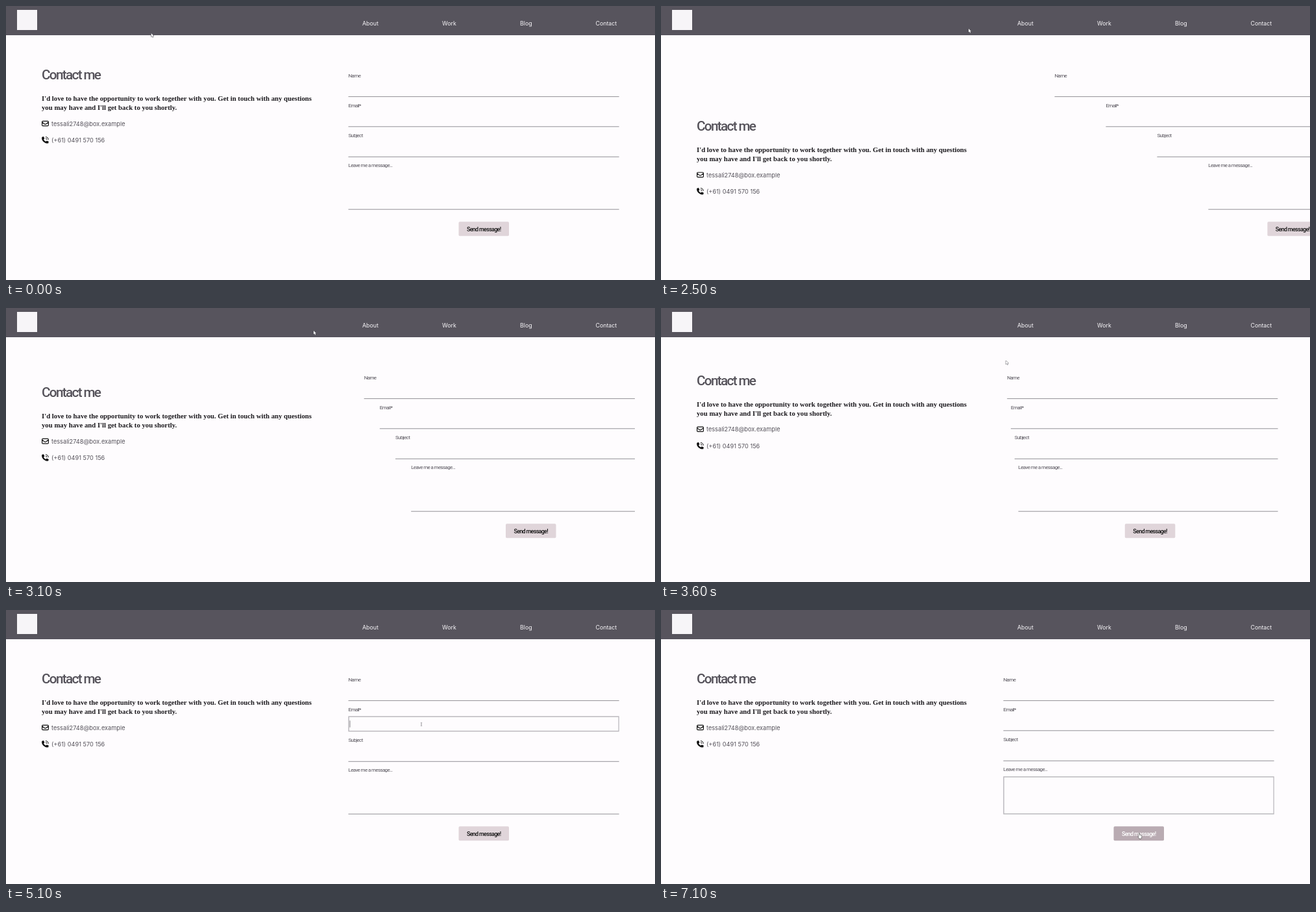
Recreate the animation shown at these times as an HTML page with a canvas. Size 1000 by 422 pixels, loop 7.3 s.

```html
<!DOCTYPE html>
<html lang="en">
<head>
<meta charset="utf-8">
<title>Contact page</title>
<style>
  html, body { margin: 0; width: 100%; height: 100%; overflow: hidden; background: #fefcfe; }
  canvas { display: block; width: 1000px; height: 422px; }
</style>
</head>
<body>
<canvas id="stage"></canvas>
<script>
const W = 1000, H = 422, LOOP = 7300, STEP = 1700 / 11;
const INK = '#55525a', PAPER = '#fefcfe', RULE = '#929096';
const LEFT = 527.5, RIGHT = 944.8;
const SANS = 'Inter, sans-serif';
const SERIF = "'Liberation Serif', serif";
const TIGHT = 'Roboto, sans-serif', TRACKING = -0.08;

const canvas = document.getElementById('stage');
const ctx = canvas.getContext('2d');
const dpr = window.devicePixelRatio || 1;
canvas.width = W * dpr;
canvas.height = H * dpr;

// Form fields: label baseline, rule position, slide-in factor, time of focus.
const fields = [
  { label: 'Name', base: 110, rule: 139.6, slide: 1, focus: 4500 },
  { label: 'Email*', base: 156.2, rule: 185.8, slide: 2, focus: 5000 },
  { label: 'Subject', base: 202.3, rule: 232.3, slide: 3, focus: 5600 },
  { label: 'Leave me a message...', base: 248.4, rule: 313.2, slide: 4, focus: 6200, tall: true },
];

// Pointer path: time, x, y.
const path = [
  [2200, 474, 35], [3400, 474, 35], [3700, 560, 104], [3900, 618, 130], [4000, 624, 133],
  [4800, 624, 133], [5100, 640, 176], [5300, 645, 205], [5400, 655, 225], [5600, 656, 227],
  [5700, 662, 243], [6000, 673, 291], [6300, 705, 326], [6500, 738, 348], [7300, 738, 348],
];

function bezierEase(x) {
  if (x <= 0) return 0;
  if (x >= 1) return 1;
  let lo = 0, hi = 1;
  for (let i = 0; i < 24; i++) {
    const u = (lo + hi) / 2;
    if (0.75 * u * (1 - u) + u ** 3 < x) lo = u; else hi = u;
  }
  return 0.3 * lo * (1 - lo) ** 2 + 3 * lo * lo * (1 - lo) + lo ** 3;
}

function heldTime(t) {
  const at = k => Math.round(k * STEP / 100) * 100;
  let k = Math.floor(t / STEP) + 1;
  while (at(k) > t) k--;
  return at(k);
}

function text(str, x, y, font, color = INK, align = 'left') {
  ctx.font = font;
  ctx.fillStyle = color;
  ctx.textAlign = align;
  ctx.fillText(str, x, y);
}

function tightText(str, x, y, weight, size, color, align) {
  ctx.letterSpacing = `${TRACKING * size}px`;
  text(str, x, y, `${weight} ${size}px ${TIGHT}`, color, align);
  ctx.letterSpacing = '0px';
}

function shape(points, fill, stroke, width) {
  ctx.beginPath();
  points.forEach(([x, y]) => ctx.lineTo(x, y));
  ctx.closePath();
  ctx.lineWidth = width;
  ctx.strokeStyle = stroke;
  ctx.fillStyle = fill;
  ctx.stroke();
  ctx.fill();
}

function line(x1, y1, x2, y2, color, width) {
  ctx.strokeStyle = color;
  ctx.lineWidth = width;
  ctx.beginPath();
  ctx.moveTo(x1, y1);
  ctx.lineTo(x2, y2);
  ctx.stroke();
}

function header() {
  ctx.fillStyle = '#57545d';
  ctx.fillRect(0, 0, W, 45);
  ctx.fillStyle = '#f7f5f8';
  ctx.fillRect(17, 6, 31, 31);
  const links = { About: 549, Work: 672, Blog: 792, Contact: 908.5 };
  for (const name in links) text(name, links[name], 30, `8.8px ${SANS}`, '#f7f5f8');
}

function envelope(x, y) {
  ctx.strokeStyle = '#111';
  ctx.lineWidth = 1.2;
  ctx.beginPath();
  ctx.roundRect(x + 0.6, y + 0.6, 9.8, 7.4, 1.2);
  ctx.moveTo(x + 0.8, y + 2.4);
  ctx.lineTo(x + 4.6, y + 5.2);
  ctx.quadraticCurveTo(x + 5.5, y + 5.8, x + 6.4, y + 5.2);
  ctx.lineTo(x + 10.2, y + 2.4);
  ctx.stroke();
}

function phone(x, y) {
  ctx.fillStyle = '#111';
  ctx.beginPath();
  ctx.moveTo(x + 0.6, y + 0.7);
  ctx.lineTo(x + 3, y + 0.1);
  ctx.lineTo(x + 4.4, y + 3.2);
  ctx.lineTo(x + 3, y + 4.5);
  ctx.quadraticCurveTo(x + 4, y + 6.8, x + 6.4, y + 7.8);
  ctx.lineTo(x + 7.7, y + 6.4);
  ctx.lineTo(x + 10.8, y + 7.8);
  ctx.lineTo(x + 10.2, y + 10.4);
  ctx.bezierCurveTo(x + 5, y + 11.6, x - 0.8, y + 6, x + 0.2, y + 1.4);
  ctx.fill();
  ctx.strokeStyle = '#111';
  ctx.lineWidth = 1;
  for (const r of [2, 4.3]) {
    ctx.beginPath();
    ctx.arc(x + 6, y + 4.9, r, -Math.PI / 2, 0);
    ctx.stroke();
  }
}

function intro(dy) {
  ctx.save();
  ctx.translate(0, dy);
  tightText('Contact me', 55, 112.8, 500, 20.7);
  const body = `bold 10.74px ${SERIF}`;
  text("I'd love to have the opportunity to work together with you. Get in touch with any questions", 55, 146, body, '#1c1a1e');
  text("you may have and I'll get back to you shortly.", 55, 160, body, '#1c1a1e');
  envelope(55, 176.7);
  text('tessali2748@box.example', 70, 184.6, `9.2px ${SANS}`);
  phone(55, 201);
  text('(+61) 0491 570 156', 70, 210.3, `9.2px ${SANS}`);
  ctx.restore();
}

function field(f, x, y, focused) {
  tightText(f.label, LEFT + x, f.base + y, 400, 8);
  const base = f.rule + y;
  if (!focused) {
    line(LEFT + x, base, RIGHT + x, base, RULE, 1);
    return;
  }
  const height = f.tall ? 57 : 22.4;
  ctx.strokeStyle = '#b7b5ba';
  ctx.lineWidth = 1.4;
  ctx.strokeRect(LEFT + x + 0.6, base + 0.8 - height, RIGHT - LEFT - 1.2, height);
}

function form(t, shift) {
  const active = fields.findLastIndex(f => t >= f.focus);
  const drop = i => (active >= 0 && i > active ? 1 : 0);
  ctx.save();
  ctx.beginPath();
  ctx.rect(0, 0, RIGHT + shift, H);
  ctx.clip();
  fields.forEach((f, i) => field(f, shift * f.slide, drop(i), i === active));
  if (active >= 0 && t < 6700) {
    const f = fields[active];
    const top = f.tall ? 261 : f.rule - 15.5;
    line(530, top, 530, top + 10.5, '#6d6b70', 0.8);
  }
  const hover = t >= 6500, x = shift * 3, y = drop(fields.length);
  ctx.fillStyle = hover ? '#b9abb2' : '#e0d5da';
  ctx.beginPath();
  ctx.roundRect(697.5 + x, 332.2 + y, 77.5, 22, 1.8);
  ctx.fill();
  tightText('Send message!', 736.2 + x, 347.2 + y, 500, 9, hover ? '#fff' : '#111', 'center');
  ctx.restore();
}

function arrow(x, y) {
  const tip = [[0, 0], [0, 5.4], [1.3, 4.3], [2.3, 6.4], [3.2, 6], [2.3, 4], [3.9, 3.9]];
  shape(tip.map(([a, b]) => [x + a, y + b]), '#fff', '#4a4850', 1);
}

function beam(x, y) {
  line(x, y - 2.5, x, y + 2.5, '#77757a', 0.8);
  line(x - 1.2, y - 2.6, x + 1.2, y - 2.6, '#99979c', 0.6);
  line(x - 1.2, y + 2.6, x + 1.2, y + 2.6, '#99979c', 0.6);
}

function hand(x, y) {
  const outline = [[-1.6, -4], [-0.6, -4], [-0.4, -1.4], [2.6, -0.6], [2.6, 2], [1.8, 4], [-1.2, 4], [-3, 0.8], [-1.6, 0.6]];
  shape(outline.map(([a, b]) => [x + a, y + b]), '#fff', '#222', 1);
}

function pointer(t) {
  if (t < 200) return arrow(223.8, 42);
  if (t < 2200) return;
  const i = path.findIndex(p => p[0] > t);
  const [a, b] = [path[i - 1], path[i]];
  const k = (t - a[0]) / (b[0] - a[0]);
  const x = a[1] + (b[1] - a[1]) * k, y = a[2] + (b[2] - a[2]) * k;
  const draw = t >= 6500 ? hand : t >= 3900 ? beam : arrow;
  draw(x, y);
}

function render(now) {
  const t = heldTime(now % LOOP);
  const shift = t < 2200 ? 0 : 108.7 * (1 - bezierEase((t - 2100) / 2100));
  ctx.setTransform(dpr, 0, 0, dpr, 0, 0);
  ctx.fillStyle = PAPER;
  ctx.fillRect(0, 0, W, H);
  header();
  intro(shift);
  form(t, shift);
  pointer(t);
  requestAnimationFrame(() => render(performance.now()));
}

render(0);
</script>
</body>
</html>
```
